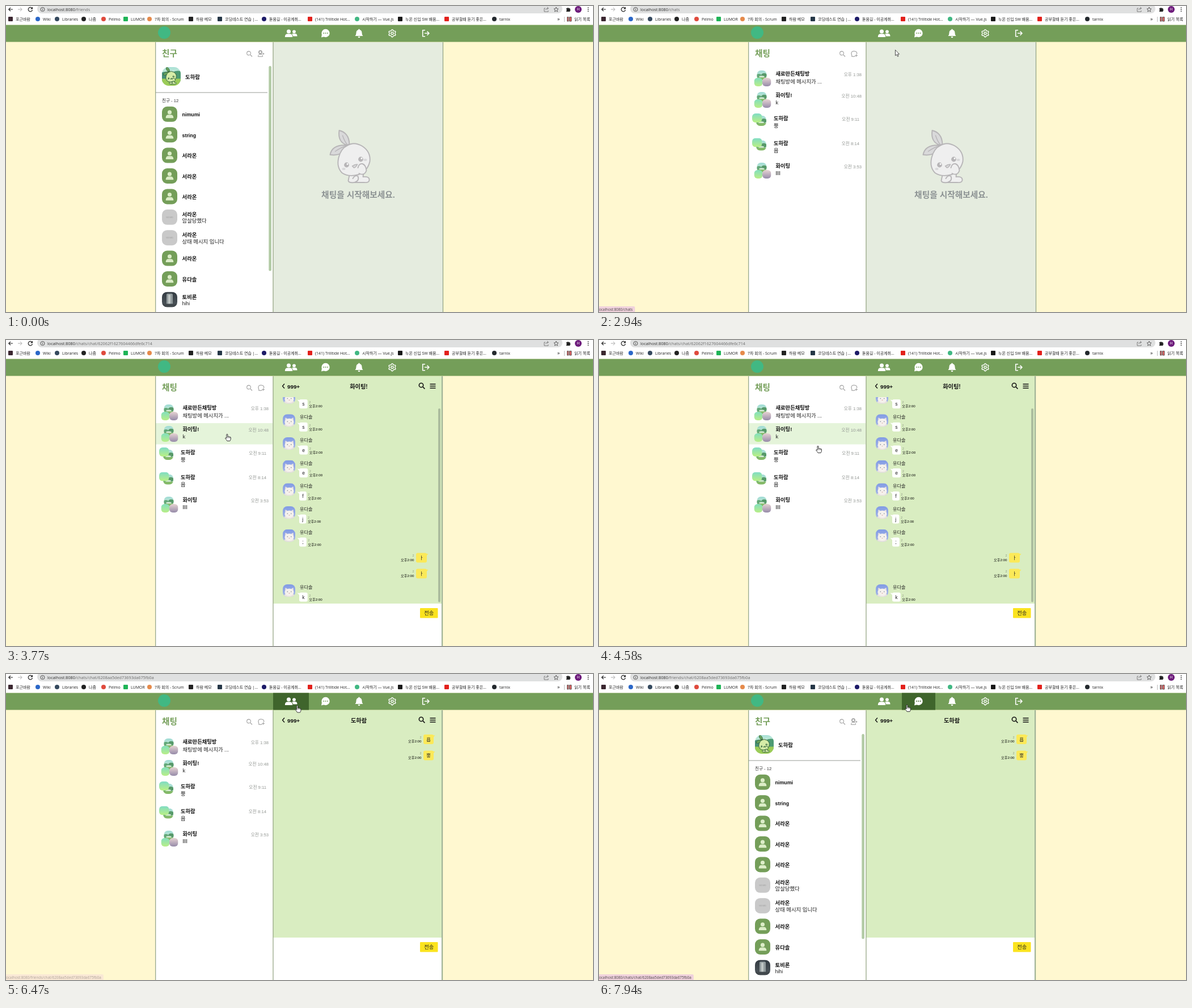
Animation of 1035x541 px, one loop 8000 ms. Source, as an HTML page with a canvas:

```html
<!DOCTYPE html>
<html lang="ko">
<head>
<meta charset="utf-8">
<style>
html, body { margin: 0; width: 100%; height: 100%; overflow: hidden; background: #fff8d0; }
canvas { display: block; }
</style>
</head>
<body>
<canvas id="stage" width="1035" height="541"></canvas>
<script>
const ctx = document.getElementById('stage').getContext('2d');
const LOOP = 8000;
const APP = '"Liberation Sans", "Noto Sans CJK KR", sans-serif';
const UI = '"Open Sans", "Noto Sans CJK KR", sans-serif';
const GREEN = '#749e59', DARK = '#3f652c', EDGE = '#8fa184';
const ME = '도하람', PAL = '서라온', MATE = '유다솔';
const ROOM_A = '62062f1627604466dfe6c714', ROOM_B = '6208aa5ded73693da675fb0a';

// ---------- helpers ----------
function rect(x, y, w, h, color, r = 0) {
  ctx.fillStyle = color;
  ctx.beginPath();
  ctx.roundRect(x, y, w, h, r);
  ctx.fill();
}
function oval(x, y, rx, ry, fill, stroke) {
  ctx.beginPath();
  ctx.ellipse(x, y, rx, ry, 0, 0, Math.PI * 2);
  if (fill) { ctx.fillStyle = fill; ctx.fill(); }
  if (stroke) { ctx.strokeStyle = stroke; ctx.stroke(); }
}
const dot = (x, y, r, fill, stroke) => oval(x, y, r, r, fill, stroke);
function path(d, fill, stroke, width = 1) {
  const p = new Path2D(d);
  if (fill) { ctx.fillStyle = fill; ctx.fill(p); }
  if (stroke) { ctx.strokeStyle = stroke; ctx.lineWidth = width; ctx.stroke(p); }
}
function text(s, x, y, size, color = '#111', { bold, align = 'left', font = APP } = {}) {
  ctx.font = `${bold ? 'bold ' : ''}${size}px ${font}`;
  ctx.textAlign = align;
  ctx.fillStyle = color;
  ctx.fillText(s, x, y + size * 0.37);
}
function at(x, y, scale, draw) {
  ctx.save();
  ctx.translate(x, y);
  ctx.scale(scale, scale);
  draw();
  ctx.restore();
}
function clipped(x, y, w, h, r, draw) {
  ctx.save();
  ctx.beginPath();
  ctx.roundRect(x, y, w, h, r);
  ctx.clip();
  draw();
  ctx.restore();
}
function fade(x, y, w, h, top, bottom) {
  const g = ctx.createLinearGradient(x, y, x, y + h);
  g.addColorStop(0, top);
  g.addColorStop(1, bottom);
  ctx.fillStyle = g;
  ctx.fillRect(x, y, w, h);
}
const clamp = v => Math.min(1, Math.max(0, v));
const ramp = (t, a, b) => clamp((t - a) / (b - a));

// ---------- pointer ----------
// start, end, steps, from, to
const moves = [
  [500, 780, 5, [1019, 535], [500, 206]],
  [980, 1720, 11, [500, 206], [556, 55]],
  [2940, 3640, 11, [556, 55], [392, 166]],
  [3770, 4110, 6, [392, 166], [386, 166]],
  [4440, 4920, 7, [386, 166], [386, 204]],
  [5800, 6540, 11, [386, 204], [514, 55]],
  [7730, 7940, 4, [514, 55], [543, 54]],
];
function pointerAt(t) {
  let pos = moves[0][3];
  for (const [start, end, steps, from, to] of moves) {
    if (t < start) break;
    const step = Math.min(steps, Math.floor((t - start) / (end - start) * (steps - 1) + 1e-6) + 1);
    const p = 1 - (1 - step / steps) ** 2.4;
    pos = from.map((v, i) => v + (to[i] - v) * p);
  }
  return pos;
}
function drawPointer([x, y], hand) {
  at(x, y, 1, () => {
    ctx.lineJoin = 'round';
    if (hand) {
      path('M-1 1Q0-.6 1 1V5Q2.2 4 3 5.2Q4.2 4.4 5 5.6Q6.4 5 6.4 7V9Q6 11 5 12.5H0Q-1 10.5-3 8.4Q-3.6 6.6-2 7L-1 8Z', '#fff', '#222', 0.9);
      path('M1 5V7.5M3 5.4V7.5M5 5.8V7.8', null, '#222', 0.6);
    } else {
      path('M0 0V10L2.3 8L4 11.6L5.6 10.9L4 7.4H7Z', '#fff', '#222', 0.8);
    }
  });
}

// ---------- browser bars ----------
const bookmarks = [
  [8, '포근바람', '#3b2730', 1], [56, 'Wiki', '#2b67c8'], [90, 'Libraries', '#35495e'],
  [137, '나줌', '#222'], [172, 'Pelmo', '#df4a3d'], [211, 'LUMOR', '#1fb457', 1],
  [253, '7차 회의 - Scrum', '#e58a4b'], [326, '하람 메모', '#222', 1],
  [377, '코딩테스트 연습 |...', '#263747', 1], [455, '돋움길 - 이공계취...', '#1d1b68'],
  [536, '(141) Trilltide Hot...', '#e3211c', 1], [619, '시작하기 — Vue.js', '#41b883'],
  [695, '누온 신입 SW 배움...', '#181818', 1], [777, '공부할때 듣기 좋은...', '#e3211c', 1],
  [861, 'tarnix', '#24292e'],
];
function drawBrowser(route) {
  rect(0, 0, 1035, 33.5, '#fff');
  rect(55, -3, 926, 16, '#dfe0e0', 8);
  path('M12 6H5M8 2.8L4.8 6L8 9.2', null, '#222', 1.2);
  path('M21 6H28M25 2.8L28.2 6L25 9.2', null, '#aaa', 1);
  path('M46 4A3.7 3.7 0 1 0 46.5 7M46.5 2V4.8H43.6', null, '#222', 1.2);
  ctx.lineWidth = 0.9;
  dot(64.5, 6, 3.5, null, '#444');
  path('M64.5 5.5V8M64.5 3.8V4.7', null, '#444', 0.9);
  const host = 'localhost:8080';
  text(host, 73, 6, 7.25, '#2c2c2c', { font: UI });
  text(route, 73 + ctx.measureText(host).width, 6, 7.25, '#6a6a6a', { font: UI });
  path('M951 4H949V10H956V8M951.5 7Q952 4 956 4M954 2L956.5 4L954 6', null, '#666', 0.8);
  path('M970 2L971.2 4.8L974 5L971.8 7L972.5 10L970 8.4L967.5 10L968.2 7L966 5L968.8 4.8Z', null, '#444', 0.8);
  path('M988 4H990Q990.5 1 992 4H994.5V6.2Q997 7 994.5 8V10H988V8Q990 7 988 6Z', '#222');
  dot(1009, 6, 6, '#6d1b7b');
  text('H', 1009, 6, 6.5, '#fff', { align: 'center', font: UI });
  for (const y of [2.8, 6, 9.2]) dot(1026.5, y, 0.9, '#333');

  for (const [x, label, color, square] of bookmarks) {
    if (square) rect(x - 4, 19, 8, 8, color, 1);
    else dot(x, 23, 4, color);
    text(label, x + 9, 23, 7, '#222', { font: UI });
  }
  text('»', 972, 22.5, 9, '#222', { font: UI });
  path('M984.5 19V28', null, '#bbb');
  path('M989.5 19.5H992V27H989.5ZM993.5 19.5H997V27H993.5Z', '#d66', '#444', 0.8);
  text('읽기 목록', 1002, 23, 7.1, '#222', { font: UI });
}

// ---------- navigation ----------
const person = (x, y, s, color) => at(x, y, s, () => {
  dot(0, -3.2, 3.4, color);
  path('M-6.5 6.5Q-6.5 1-2 1H2Q6.5 1 6.5 6.5Z', color);
});
function drawNav(hover) {
  rect(0, 33.5, 1035, 30, GREEN);
  if (hover === 'friends') rect(471, 33.5, 63, 30, DARK);
  if (hover === 'chats') rect(534, 33.5, 59, 30, DARK);
  dot(279, 47, 11, '#41b883');
  person(508, 48, 0.85, '#fff');
  const back = hover === 'friends' ? DARK : GREEN;
  at(498.5, 48, 1, () => path('M-7.5 7V5Q-7 0-2 0H2Q7.5 0 7.5 7Z', back));
  person(498.5, 48.2, 1.03, '#fff');
  dot(563.5, 48, 7.2, '#fff');
  path('M557 50L556 55.5L562 54Z', '#fff');
  for (const dx of [-3.3, 0, 3.3]) dot(563.5 + dx, 48, 1, hover === 'chats' ? DARK : GREEN);
  path('M622.5 40.5Q623.5 40.5 623.7 42Q627.5 43 627.5 47.5Q627.5 51 629.5 53H615.5Q617.5 51 617.5 47.5Q617.5 43 621.3 42Q621.5 40.5 622.5 40.5ZM620.5 54H624.5Q624 56.2 622.5 56.2Q621 56.2 620.5 54Z', '#fff');
  ctx.strokeStyle = '#fff';
  ctx.lineWidth = 1.4;
  ctx.lineJoin = 'round';
  ctx.beginPath();
  for (let i = 0; i < 24; i++) {
    const r = i % 4 < 2 ? 6.5 : 5, a = (i + 0.5) / 24 * Math.PI * 2 - Math.PI / 2 - 0.26;
    ctx.lineTo(681 + r * Math.cos(a), 48.3 + r * Math.sin(a));
  }
  ctx.closePath();
  ctx.stroke();
  dot(681, 48.3, 2.1, null, '#fff');
  path('M739 42.7H734.7V53.7H739M738 48.2H745.5M742.5 44.7L746 48.2L742.5 51.7', null, '#fff', 1.6);
}

// ---------- pictures ----------
function mascot(line, skin, leaf, width) {
  ctx.lineJoin = ctx.lineCap = 'round';
  path('M31 27Q14 22 17 1Q34 5 35 25Z', leaf, line, width);
  path('M30 29Q24 47 1 44Q4 26 30 27Z', leaf, line, width);
  path('M23 10Q26 20 32 27M10 38Q20 31 30 28', null, line, width * 0.7);
  path('M38 70Q34 83 33 90Q34 94 43 93L61 93Q71 94 70 87Q69 82 59 83L61 67Z', skin, line, width);
  path('M44 93Q53 90 50 82Q45 79 41 86', skin, line, width);
  path('M31 28Q43 20 58 29Q73 39 71 56Q67 73 51 79Q33 84 22 76Q12 66 16 49Q20 33 31 28Z', skin, line, width);
  dot(30, 62, 4.4, line);
  dot(55, 52, 4.4, line);
  dot(31.5, 60.5, 1.4, '#fff');
  dot(56.5, 50.5, 1.4, '#fff');
  path('M40 64Q44 61 49 61Q46 67 43 67Z', leaf, line, width * 0.8);
  oval(25, 69, 3, 2, leaf);
  oval(63, 53, 3, 2, leaf);
  path('M50 67Q52 59 58 60Q64 62 65 72Q61 82 52 77', skin, line, width);
}
function profile(x, y, s) {
  clipped(x, y, s, s, s * 0.36, () => {
    fade(x, y, s, s * 0.6, '#a8e0d6', '#e4f5da');
    oval(x + s * 0.2, y + s * 0.55, s * 0.4, s * 0.3, '#478f76');
    oval(x + s * 0.85, y + s * 0.5, s * 0.4, s * 0.3, '#4d9a73');
    rect(x, y + s * 0.62, s, s * 0.4, '#9bcc58');
    at(x + 2, y - 0.5, s / 100, () => mascot('#35643a', '#d5eca7', '#78b66a', 3));
  });
}
function landscape(x, y, s) {
  clipped(x, y, s, s, s * 0.4, () => {
    fade(x, y, s, s, '#9edbd5', '#dcefd2');
    oval(x + s * 0.2, y + s * 0.55, s * 0.3, s * 0.2, '#62a878');
    oval(x + s * 0.75, y + s * 0.5, s * 0.3, s * 0.22, '#57996a');
    oval(x + s * 0.5, y + s * 0.65, s * 0.28, s * 0.1, '#d5ebd5');
    rect(x, y + s * 0.72, s, s * 0.3, '#84b968');
  });
}
const tint = (x, y, w, h, a, b) => clipped(x, y, w, h, 6, () => fade(x, y, w, h, a, b));
function groupIcon(y) {
  landscape(278.5, y - 14, 17);
  tint(273.5, y - 1, 15, 15, '#83dfbe', '#b9ee87');
  tint(288, y - 1, 15.5, 15, '#e7d3d3', '#968ba9');
}
function pairIcon(y) {
  landscape(277, y - 6, 18);
  tint(270, y - 10, 17.5, 16, '#80dcc5', '#baf083');
}
function cat(x, y) {
  clipped(x, y, 22, 22, 8, () => {
    fade(x, y, 22, 22, '#819be5', '#a9b8e6');
    at(x, y, 1, () => {
      path('M4 13L4.5 6Q6 6 9 9H14Q17 6 18.500 6L19 13Z', '#e9e3e2');
      oval(11.5, 21, 9.5, 6, '#e9e3df');
      oval(11.5, 14, 8, 6.5, '#f5f1ed');
      dot(8.3, 13, 0.8, '#77808c');
      dot(14.8, 13, 0.8, '#77808c');
      oval(11.5, 15.7, 1, 0.7, '#d8a5a0');
    });
  });
}

// ---------- left side ----------
const friends = [
  ['nimumi'], ['string'], [PAL], [PAL], [PAL], [PAL, '암살당했다', 'blank'],
  [PAL, '상태 메시지 입니다', 'blank'], [PAL], [MATE], ['토비론', 'hihi', 'photo'],
];
function friendIcon(y, kind) {
  const x = 275, top = y - 13.5;
  if (kind === 'blank') {
    rect(x, top, 27, 27, '#c9c9c9', 9);
    text('NO IMG', x + 13.5, y, 3.4, '#aaa', { align: 'center', bold: true });
  } else if (kind === 'photo') {
    clipped(x, top, 27, 27, 9, () => {
      fade(x, top, 27, 27, '#333b42', '#50585d');
      rect(x + 8, top + 3, 11, 21, '#929b9d', 2);
      rect(x + 11, top + 5, 4, 18, '#c0c6c5');
      rect(x, top + 21, 27, 6, '#41484c');
    });
  } else {
    rect(x, top, 27, 27, GREEN, 9);
    person(x + 13.5, y, 1.05, '#dcedc8');
  }
}
function searchIcon(x, y, s, color, width) {
  at(x, y, s, () => path('M2.5-1A3.4 3.4 0 1 1-4.3-1A3.4 3.4 0 1 1 2.5-1M1.7 1.6L5 5', null, color, width));
}
function drawFriends() {
  profile(275, 108, 33);
  text(ME, 316, 126, 9.4, '#111', { bold: true });
  path('M264 153H461', null, '#979b95');
  text('친구 - 12', 275, 167, 7.6, '#333');
  friends.forEach(([name, note, icon], i) => {
    const y = 191.3 + 36.4 * i;
    friendIcon(y, icon);
    text(name, 310.5, y + (note ? -4.8 : 0.6), name.length > 4 ? 8.9 : 9.4, '#111', { bold: true });
    if (note) text(note, 310.5, y + 6.6, note === 'hihi' ? 8.8 : 9.4, '#222');
  });
  rect(463.3, 106, 4.6, 362.5, '#b3cba6', 2.3);
}
// middle, name, last message, time, group?, top, bottom
const chats = [
  [128, '새로만든채팅방', '채팅방에 메시지가 ...', '오후 1:38', 1, 108, 147],
  [166, '화이팅!', 'k', '오전 10:48', 1, 147, 184.5],
  [200, ME, '뿡', '오전 9:11', 0, 184.5, 228],
  [243.5, ME, '욥', '오전 8:14', 0, 228, 272],
  [291, '화이팅', 'llll', '오전 3:53', 1, 272, 310],
];
function drawChats(hover) {
  chats.forEach(([y, name, last, time, group, top, bottom], i) => {
    if (hover === i) rect(264, top, 206, bottom - top, '#e5f4da');
    const x = group ? 311.5 : 308, nameY = group ? y - 8 : y - 1;
    if (group) groupIcon(y); else pairIcon(y);
    text(name, x, nameY, 9.3, '#111', { bold: true });
    text(last, x, nameY + (i === 0 ? 13.5 : group ? 12.3 : 13), 9.3, '#222');
    text(time, group ? 463 : 459, nameY + 1, 7.7, '#929692', { align: 'right' });
  });
}
function drawSide(onFriends, ready, hover) {
  rect(264, 64, 206.5, 477, '#fff');
  text(onFriends ? '친구' : '채팅', 275, 84, 14.6, GREEN, { bold: true });
  searchIcon(429, 84.5, 1, '#a0a0a0', 1.1);
  if (onFriends) {
    dot(448.5, 81.7, 2.6, null, '#a0a0a0');
    path('M444.5 89.5Q444.5 85.3 448.5 85.3Q452.5 85.3 452.5 89.5ZM452 84.5H455.5M453.7 82.7V86.3', null, '#a0a0a0', 1);
  } else {
    path('M452 88.5Q449 90 445.5 89Q446.5 88 445.5 86.5Q443.5 80 449.5 79.7Q455.5 80 454.7 85M451.5 87.5H456M453.7 85.3V89.7', null, '#a0a0a0', 1.1);
  }
  if (!ready) return;
  if (onFriends) drawFriends(); else drawChats(hover);
}

// ---------- right side ----------
function drawIdle() {
  rect(471, 64, 299, 477, '#e5ecdf');
  at(570.5, 219, 1, () => mascot('#b7b5b7', '#efefef', '#d9d9da', 1.9));
  text('채팅을 시작해보세요.', 621, 334, 14.7, '#8c9293', { bold: true, align: 'center' });
}
function stamp(x, y, align) {
  text('2', x, y - 7, 5.5, '#8d9b82', { align });
  text('오후2:00', x, y, 6.2, '#000', { align });
}
function theirs(y, s) {
  cat(488, y - 5);
  text(MATE, 518, y, 8.2, '#222');
  ctx.font = `8.5px ${APP}`;
  const w = 10.5 + ctx.measureText(s).width;
  path(`M513.5 ${y + 10}L519 ${y + 11}V${y + 16}Z`, '#fff');
  rect(517, y + 9.5, w, 16, '#fff', 3);
  text(s, 517 + w / 2, y + 17.5, 8.5, '#222', { align: 'center' });
  stamp(517 + w + 2.5, y + 21.6, 'left');
}
function mine(right, y, s, w) {
  path(`M${right + 2.5} ${y - 7}L${right - 1} ${y - 7}V${y - 3}Z`, '#fbe958');
  rect(right - w, y - 8.5, w, 17, '#fbe958', 3);
  text(s, right - w / 2, y, 8.3, '#222', { align: 'center' });
  stamp(right - w - 3.5, y + 3.3, 'right');
}
function drawRoom(title, room, ready) {
  rect(471, 64, 297, 402, '#d9edc1');
  rect(471, 466, 297, 75, '#fff');
  rect(768, 64, 2.2, 477, '#a0b397');
  path('M491 77.5L487.5 81.5L491 85.5', null, '#111', 1.4);
  text('999+', 496, 82, 9.8, '#111', { bold: true });
  text(title, 622, 82.3, 10.2, '#111', { bold: true, align: 'center' });
  searchIcon(733, 81, 1.08, '#111', 1.5);
  path('M747.5 78H757.5M747.5 81.5H757.5M747.5 85H757.5', null, '#111', 1.4);
  rect(730, 474, 31.5, 17.5, '#fbe31f', 1);
  text('전송', 745.7, 483, 9.3, '#222', { align: 'center' });
  if (!ready) return;
  if (room === 'B') {
    mine(754, 115.5, '욥', 18);
    mine(754, 144, '뿡', 18);
    return;
  }
  clipped(472, 101, 296, 365, 0, () => {
    [...'sseefj;'].forEach((s, i) => theirs(95.5 + 40.7 * i, s));
    mine(742, 385, 'ㅏ', 19);
    mine(742, 413, 'ㅏ', 19);
    theirs(437, 'k');
  });
  rect(762, 121, 4, 342.5, '#acbd9e', 2);
}

// ---------- status bubble ----------
function drawStatus(t) {
  const early = t < 4000;
  const alpha = early ? ramp(t, 1570, 1750) * (1 - ramp(t, 2940, 3080)) : ramp(t, 6390, 6580);
  if (!alpha) return;
  const route = early ? '/chats' : `/${t < 7790 ? 'friends' : 'chats'}/chat/${ROOM_B}`;
  const label = 'localhost:8080' + route;
  ctx.save();
  ctx.globalAlpha = alpha;
  ctx.font = `6.35px ${UI}`;
  rect(-3, 531, ctx.measureText(label).width + 5.5, 12, '#f0d2dc', 2);
  text(label, -1.6, 537, 6.35, '#4c4549', { font: UI });
  ctx.restore();
}

// ---------- frame ----------
function render(t) {
  const onFriends = t < 1960 || t >= 6610;
  const ready = t < 1960 || (t >= 2410 && t < 6610) || t >= 6680;
  const room = t < 3640 ? '' : t < 5060 ? 'A' : 'B';
  const roomPath = room && `/chat/${room === 'A' ? ROOM_A : ROOM_B}`;
  const pos = pointerAt(t), [x, y] = pos, hit = y - 3;
  const navHover = hit < 64 ? (x >= 534 ? 'chats' : x >= 471 ? 'friends' : '') : '';
  const row = x < 470 && !onFriends && ready
    ? chats.findIndex(c => hit >= c[5] && hit < c[6]) : -1;

  rect(0, 0, 1035, 541, '#fff8d0');
  drawBrowser((onFriends ? '/friends' : '/chats') + roomPath);
  drawNav(navHover);
  drawSide(onFriends, ready, row);
  if (room) drawRoom(t < 3770 ? '' : t < 5320 ? '화이팅!' : ME, room, t >= (room === 'A' ? 3770 : 5320));
  else drawIdle();
  path('M263.7 64V541M471 64V541', null, EDGE, 1.2);
  if (!room) path('M770.5 64V541', null, EDGE, 1.2);
  drawStatus(t);
  if ((t >= 3500 && t < 3770) || (t >= 5060 && t < 5320)) dot(x, y + 0.5, 6.5, 'rgba(252,240,50,.8)');
  if (t >= 300) drawPointer(pos, navHover || row >= 0);
}
function tick() {
  render(performance.now() % LOOP);
  requestAnimationFrame(tick);
}
tick();
</script>
</body>
</html>
```
